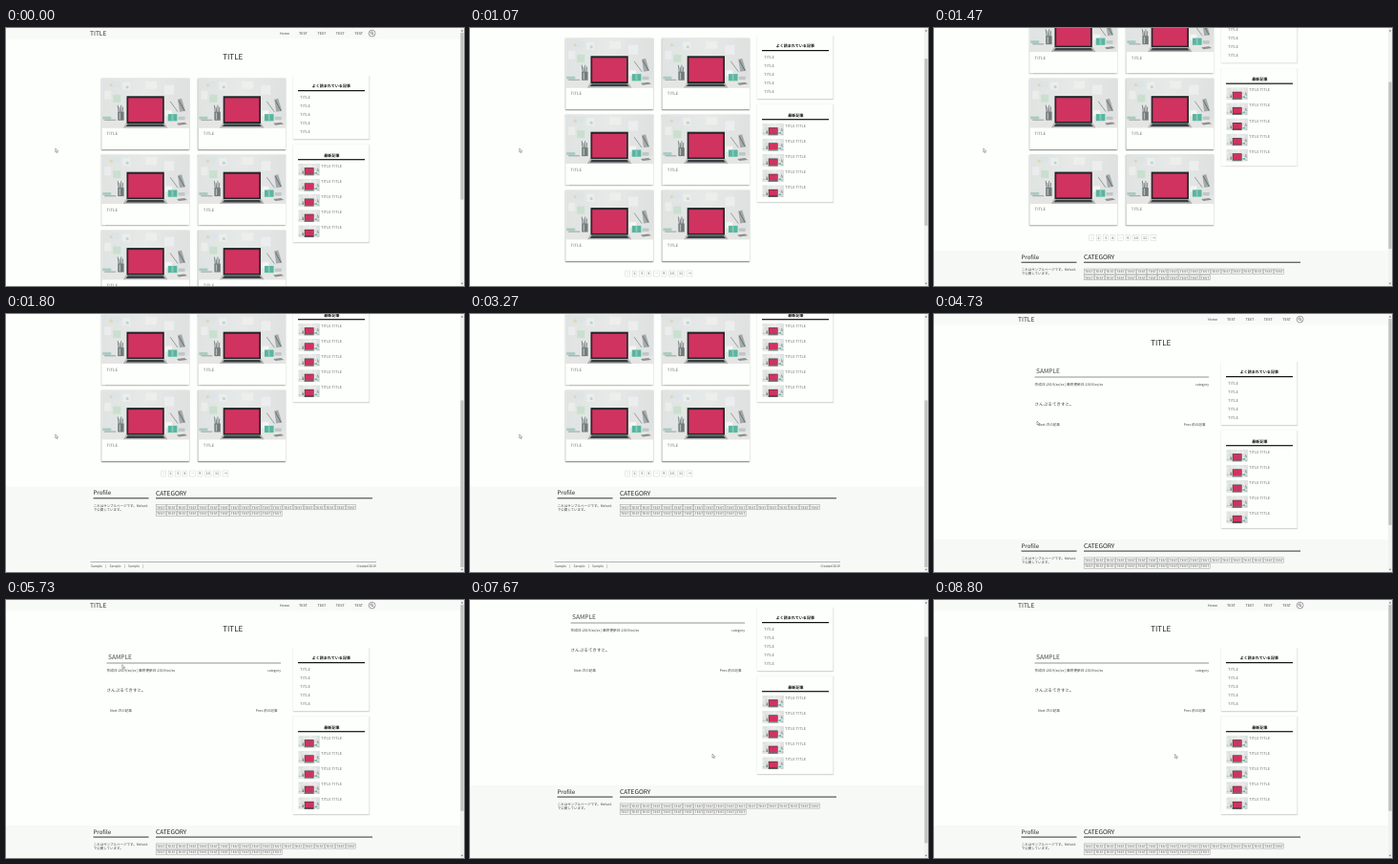
Write an HTML page with a canvas that moves like this. It is 480 px wide and 270 px high and loops after 9.87 s.

```html
<!DOCTYPE html>
<html lang="ja">
<head>
<meta charset="utf-8">
<title>Blog theme demo</title>
<style>
html, body { margin: 0; width: 100%; height: 100%; overflow: hidden; background: #fdfffc; }
canvas { display: block; width: 480px; height: 270px; }
</style>
</head>
<body>
<canvas id="stage"></canvas>
<script>
const W = 480, H = 270, LOOP = 9870, STEP = 1000 / 15;
const FOOT_H = 89.3, HOME_H = 402, POST_H = 325.3;
const OPEN_POST = 4730;
const PAGE = '#fdfffc';
const FONT = '"Noto Sans CJK JP", "Noto Sans CJK", "Noto Sans", sans-serif';

const canvas = document.getElementById('stage');
const ctx = canvas.getContext('2d');
const dpr = window.devicePixelRatio || 1;
canvas.width = W * dpr;
canvas.height = H * dpr;

// Keyframes: [time, value, ...]
const scrollKeys = [
  [800, 0], [1067, 42], [1200, 42], [1800, 132],
  [3467, 132], [3533, 45], [3600, 6.5], [3867, 0],
  [7400, 0], [7667, 42], [7933, 55.3], [8267, 55.3], [8333, 20], [8400, 0]
];
const cursorKeys = [
  [4400, 51.8, 126], [4667, 108, 112], [4733, 108, 112], [5000, 89, 133],
  [5200, 89, 133], [5733, 121.8, 67.6], [6067, 121.8, 67.6], [6600, 199.5, 129],
  [7133, 199.5, 129], [7467, 254, 161], [7667, 254, 161], [7867, 252.6, 161.4]
];

function track(keys, t) {
  const i = keys.findIndex(k => k[0] > t);
  if (i === 0) return keys[0].slice(1);
  if (i < 0) return keys[keys.length - 1].slice(1);
  const a = keys[i - 1], b = keys[i];
  const p = (t - a[0]) / (b[0] - a[0]);
  const e = p * p * (3 - 2 * p);
  return a.slice(1).map((v, n) => v + (b[n + 1] - v) * e);
}

function rect(x, y, w, h, color) {
  ctx.fillStyle = color;
  ctx.fillRect(x, y, w, h);
}

function poly(points, color) {
  ctx.fillStyle = color;
  ctx.beginPath();
  for (let i = 0; i < points.length; i += 2) ctx.lineTo(points[i], points[i + 1]);
  ctx.closePath();
  ctx.fill();
}

function line(x1, y1, x2, y2, color, width) {
  ctx.strokeStyle = color;
  ctx.lineWidth = width;
  ctx.beginPath();
  ctx.moveTo(x1, y1);
  ctx.lineTo(x2, y2);
  ctx.stroke();
}

function box(x, y, w, h, color, width) {
  ctx.strokeStyle = color;
  ctx.lineWidth = width;
  ctx.strokeRect(x, y, w, h);
}

// y is the vertical centre of the capitals
function text(str, x, y, size, color = '#444', align = 'left', weight = 400) {
  ctx.font = `${weight} ${size}px ${FONT}`;
  ctx.textRendering = 'geometricPrecision';
  ctx.textAlign = align;
  ctx.fillStyle = color;
  ctx.fillText(str, x, y + size * 0.37);
}

function panel(x, y, w, h, alpha) {
  ctx.save();
  ctx.shadowColor = `rgba(0,0,0,${alpha})`;
  ctx.shadowBlur = 1.2 * dpr;
  ctx.shadowOffsetY = 0.6 * dpr;
  rect(x, y, w, h, PAGE);
  ctx.restore();
}

function blob(x, y, r, color) {
  ctx.fillStyle = color;
  ctx.beginPath();
  ctx.arc(x, y, r, 0, Math.PI * 2);
  ctx.fill();
}

// Desk with a laptop, laid out on a 92 x 52 grid
function photo(x, y, scale) {
  ctx.save();
  ctx.translate(x, y);
  ctx.scale(scale, scale);
  ctx.beginPath();
  ctx.rect(0, 0, 92, 52);
  ctx.clip();
  const wall = ctx.createLinearGradient(0, 0, 92, 0);
  wall.addColorStop(0, '#dfe3e2');
  wall.addColorStop(0.5, '#e6e9e7');
  wall.addColorStop(1, '#dfe1e1');
  rect(0, 0, 92, 52, wall);
  rect(10, 3, 9, 6, '#dbe4e6');
  rect(22, 4, 8, 8, '#eceee9');
  rect(12, 17, 8, 8, '#c9e0ce');
  rect(3, 13, 7, 9, '#eaedeb');
  blob(10, 7, 1.6, '#e6d2b4');
  blob(27, 9, 1.6, '#b9d5e0');
  rect(46, 3, 12, 8, '#eeefec');
  rect(66, 7, 10, 10, '#ecedee');
  rect(0, 43, 92, 9, '#e5e6e3');
  // Lamp and chair
  line(72, 24, 80, 35, '#8e9595', 0.9);
  poly([80, 22, 84, 21, 88, 34, 82, 35], '#a2a9a9');
  line(81, 23, 87, 34, '#646b6c', 0.9);
  // Pens and cup
  for (let i = 0; i < 4; i++) line(17 + i * 1.8, 28 + i % 2 * 2, 18 + i * 1.3, 36, '#596061', 0.7);
  rect(17, 35, 6.4, 9, '#737a7b');
  rect(18.5, 36, 1.3, 7, '#b3baba');
  rect(1, 40, 9, 2.8, '#a9c9c2');
  rect(3, 43, 12, 1.3, '#a9b0ae');
  // Mug, box and phone
  rect(67, 33.5, 7, 6, '#f4f5f3');
  rect(69.7, 37.4, 9.6, 7.2, '#57b5a0');
  rect(73.5, 37.4, 1.8, 7.2, '#83cbbb');
  rect(80.5, 40, 7, 3.5, '#c0c6c6');
  poly([79, 47, 87, 46, 90, 47.8, 81, 49], '#8a9090');
  // Laptop
  rect(26.3, 18.5, 39.4, 28.8, '#25282a');
  rect(28, 20.6, 36, 24.8, '#d0335f');
  poly([25.5, 47.2, 66.5, 47.2, 69.5, 52, 22.5, 52], '#b4b7b7');
  poly([27.5, 47.8, 64.5, 47.8, 66.5, 50.4, 25.5, 50.4], '#3a3e40');
  ctx.restore();
}

function header() {
  rect(0, 0, 476, 11.6, '#f8faf7');
  text('TITLE', 88, 6, 6.6, '#333');
  text('Home', 287, 6, 3.6);
  for (let i = 0; i < 4; i++) text('TEST', 307 + i * 19.4, 6, 3.75);
  ctx.strokeStyle = '#666';
  ctx.lineWidth = 0.6;
  ctx.beginPath();
  ctx.arc(383.6, 5.6, 3.4, 0, Math.PI * 2);
  ctx.stroke();
  ctx.beginPath();
  ctx.arc(383.2, 5.1, 1.2, 0, Math.PI * 2);
  ctx.stroke();
  line(384.1, 6, 385.3, 7.2, '#555', 0.8);
  text('TITLE', 237.7, 30.3, 8, '#222', 'center');
}

function sidebar() {
  panel(301, 49, 79.5, 67, 0.2);
  text('よく読まれている記事', 340.8, 60.7, 4.05, '#111', 'center', 700);
  rect(306, 65, 70, 1.2, '#111');
  for (let i = 0; i < 5; i++) text('TITLE', 308, 72 + i * 9, 4.2, '#777');

  panel(301, 121.7, 79.5, 102.3, 0.2);
  text('最新記事', 341.4, 133, 4.1, '#111', 'center', 700);
  rect(306, 137.1, 70, 1.2, '#111');
  for (let i = 0; i < 5; i++) {
    const y = 141.7 + i * 16.15;
    photo(306.3, y, 0.247);
    text('TITLE TITLE', 330, y + 2.6, 4.05, '#777');
  }
}

function cards() {
  for (let i = 0; i < 6; i++) {
    const x = 100.2 + i % 2 * 101.2;
    const y = 52.8 + Math.floor(i / 2) * 79.4;
    panel(x, y, 91.8, 74.3, 0.5);
    photo(x, y, 0.998);
    text('TITLE', x + 5.4, y + 57.8, 4.35, '#777');
  }
}

function pager() {
  const labels = ['1', '2', '3', '4', '…', '9', '10', '11', '→'];
  let x = 162.8;
  labels.forEach((label, i) => {
    const w = label.length > 1 ? 6.6 : label === '…' || label === '→' ? 5.9 : 4.7;
    box(x, 296, w, 6, '#d4d6d3', 0.5);
    text(label, x + w / 2, 299, 3.6, i ? '#555' : '#ccc', 'center');
    x += w + 2.7;
  });
}

function post() {
  text('SAMPLE', 107, 59.6, 6.6, '#444');
  rect(105.5, 65.6, 182.5, 0.8, '#777');
  text('作成日:2019/xx/xx | 最終更新日:2019/xx/xx', 105.5, 73.4, 3.72);
  text('category', 288, 73.4, 3.45, '#444', 'right');
  text('さんぷるてきすと。', 105.5, 94.6, 4.6);
  text('Next:次の記事', 109, 115.6, 3.58);
  text('Prev:前の記事', 284.5, 115.6, 3.58, '#444', 'right');
}

function footer(y) {
  rect(0, y, 476, FOOT_H, '#f7f9f6');
  text('Profile', 91.5, y + 6.4, 6.1, '#222');
  rect(91.5, y + 11.5, 58, 1.2, '#555');
  text('これはサンプルページです。Melvok', 91.7, y + 19.9, 3.5);
  text('で公開しています。', 91.7, y + 23.7, 3.5);

  text('CATEGORY', 157, y + 6.4, 6.5, '#222');
  rect(157, y + 11.5, 227, 1.2, '#555');
  for (let i = 0; i < 31; i++) {
    const x = 157.2 + i % 19 * 11.07;
    const ty = y + 21.5 + (i < 19 ? 0 : 6.5);
    box(x, ty - 2.6, 10.2, 5.2, '#999', 0.5);
    text('TEST', x + 5.1, ty, 3.6, '#555', 'center');
  }

  rect(88.5, y + 78.5, 299.5, 0.6, '#888');
  for (let i = 0; i < 3; i++) {
    text('Sample', 89 + i * 19.5, y + 82.8, 3.35);
    text('|', 104.6 + i * 19.5, y + 82.8, 3.35, '#444', 'center');
  }
  text('Created 2019', 388, y + 82.8, 3.4, '#444', 'right');
}

function scrollbar(scroll, pageH) {
  rect(476, 0, 4, H, '#f1f1f1');
  const room = 260;
  rect(476.4, 5 + scroll * room / pageH, 3.2, room * H / pageH, '#c1c1c1');
  poly([478, 1.8, 479.2, 3.4, 476.8, 3.4], '#777');
  poly([478, 268.4, 479.2, 266.8, 476.8, 266.8], '#777');
}

function cursor(x, y) {
  const shape = [0, 0, 0, 4, 0.9, 3.2, 1.6, 4.7, 2.3, 4.4, 1.7, 2.9, 2.9, 2.9];
  ctx.save();
  ctx.translate(x, y);
  poly(shape, '#fff');
  ctx.strokeStyle = '#666';
  ctx.lineWidth = 0.5;
  ctx.stroke();
  ctx.restore();
}

function draw(t) {
  const home = t < OPEN_POST;
  const pageH = home ? HOME_H : POST_H;
  const [scroll] = track(scrollKeys, t);

  ctx.setTransform(dpr, 0, 0, dpr, 0, 0);
  rect(0, 0, W, H, PAGE);
  ctx.save();
  ctx.translate(0, -scroll);
  header();
  if (home) {
    cards();
    pager();
  } else {
    post();
  }
  sidebar();
  footer(pageH - FOOT_H);
  ctx.restore();
  scrollbar(scroll, pageH);
  cursor(...track(cursorKeys, t));
}

function frame(now) {
  const t = now % LOOP;
  draw(Math.floor((t + 4) / STEP) * STEP);
  requestAnimationFrame(frame);
}
requestAnimationFrame(frame);
</script>
</body>
</html>
```
